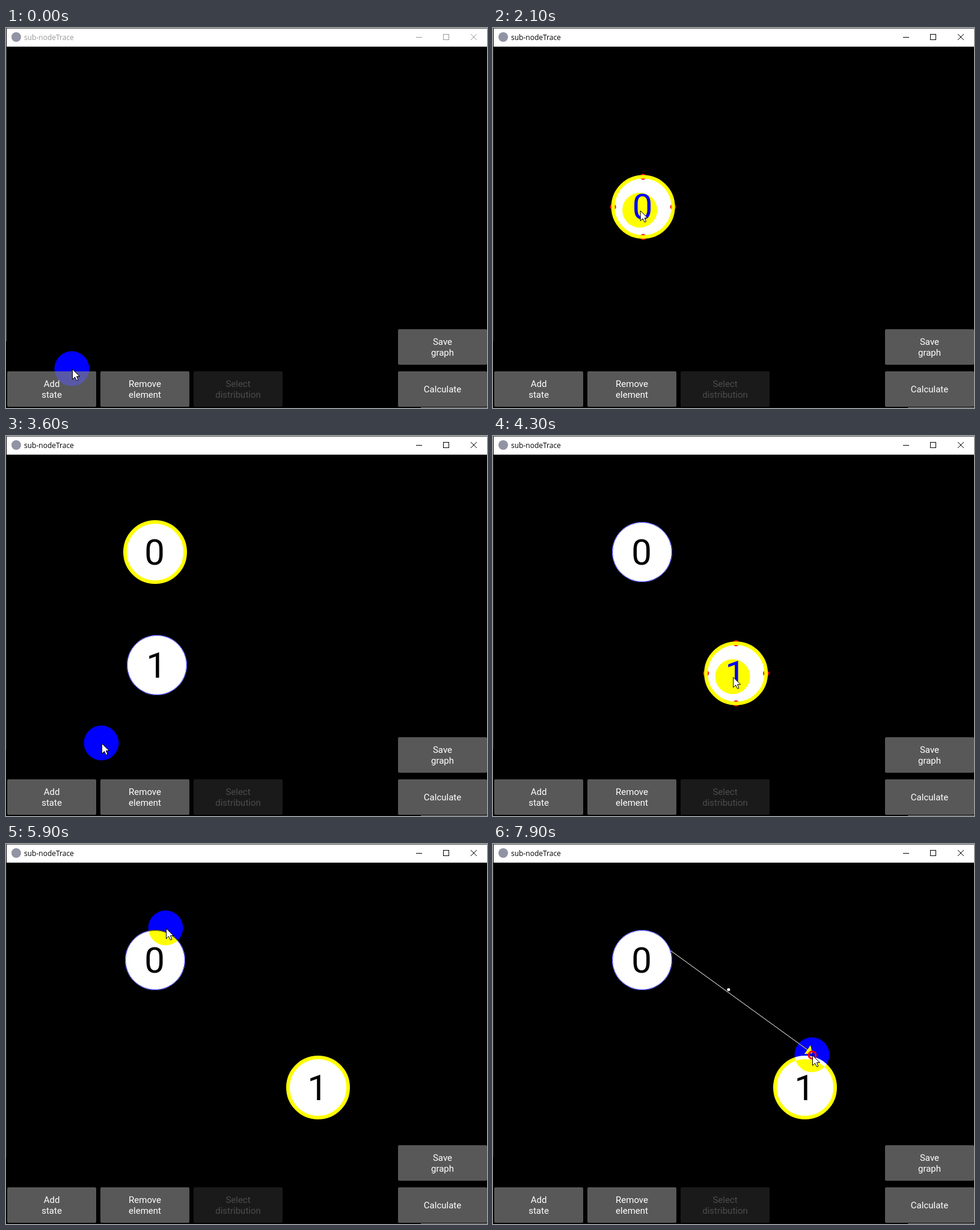
An HTML page with a canvas that plays this animation: 800x632 px, repeating every 8 s.

```html
<!DOCTYPE html>
<html lang="en">
<head>
<meta charset="utf-8">
<style>
  html, body { margin: 0; height: 100%; overflow: hidden; background: #000; }
  canvas { display: block; }
</style>
</head>
<body>
<canvas width="800" height="632"></canvas>
<script>
const ctx = document.querySelector('canvas').getContext('2d');
const LOOP = 8000, TICK = 100;
const WHITE = '#fff', YELLOW = '#ff0', RED = '#f00';
const RADIUS = 50;
const SPAWN = [251, 381], ADD_BUTTON = [97, 590], GRAB = [246, 387], ANCHOR = [248, 146];

// Pointer stops, joined by straight moves
const stops = [
  { t: 100, at: [110, 567] },
  { t: 500, at: ADD_BUTTON },
  { t: 900, at: ADD_BUTTON },
  { t: 1400, at: [179, 424] },
  { t: 1700, at: GRAB },
  { t: 2600, at: [243, 199] },
  { t: 3300, at: ADD_BUTTON },
  { t: 3500, at: ADD_BUTTON },
  { t: 3600, at: [159, 511] },
  { t: 3900, at: GRAB },
  { t: 4600, at: [514, 411] },
  { t: 5100, at: [381, 259] },
  { t: 5900, at: [266, 140] },
  { t: 6300, at: ANCHOR },
  { t: 7000, at: ANCHOR },
  { t: 7900, at: [531, 351] }
];

const nodes = [
  { label: '0', press: 700, born: 800, grab: 1700, drop: 2600, deselect: 3900 },
  { label: '1', press: 3400, born: 3500, grab: 3900, drop: 4600, deselect: LOOP }
];
const EDGE_START = 7000, EDGE_CLICK = 7900;

const clamp = (v, lo, hi) => Math.min(Math.max(v, lo), hi);

function pointerAt(t) {
  t = clamp(t, stops[0].t, stops[stops.length - 1].t);
  const i = Math.max(1, stops.findIndex(s => s.t >= t));
  const a = stops[i - 1], b = stops[i];
  const k = (t - a.t) / (b.t - a.t);
  return a.at.map((v, axis) => v + (b.at[axis] - v) * k);
}

function nodeCenter({ grab, drop }, t) {
  const p = pointerAt(clamp(t, grab, drop));
  return SPAWN.map((v, axis) => v + p[axis] - GRAB[axis]);
}

function disc(x, y, r, color) {
  ctx.fillStyle = color;
  ctx.beginPath();
  ctx.arc(x, y, r, 0, Math.PI * 2);
  ctx.fill();
}

function ring(x, y, r, width, color) {
  ctx.strokeStyle = color;
  ctx.lineWidth = width;
  ctx.beginPath();
  ctx.arc(x, y, r, 0, Math.PI * 2);
  ctx.stroke();
}

function lines(color, ...segments) {
  ctx.strokeStyle = color;
  ctx.lineWidth = 1;
  ctx.beginPath();
  for (const [x1, y1, x2, y2] of segments) {
    ctx.moveTo(x1, y1);
    ctx.lineTo(x2, y2);
  }
  ctx.stroke();
}

function polygon(points, color) {
  ctx.fillStyle = color;
  ctx.beginPath();
  points.forEach(p => ctx.lineTo(...p));
  ctx.closePath();
  ctx.fill();
}

function rect(x, y, w, h, color) {
  ctx.fillStyle = color;
  ctx.fillRect(x, y, w, h);
}

function text(str, x, y, font, color, align = 'center') {
  ctx.font = font;
  ctx.fillStyle = color;
  ctx.textAlign = align;
  ctx.fillText(str, x, y);
}

function drawWindow(active) {
  const ink = active ? '#000' : '#999';
  rect(0, 0, 800, 632, '#000');
  rect(0, 31, 1, 490, active ? '#222' : '#555');
  rect(0, 0, 800, 1, '#444');
  rect(690, 631, 110, 1, '#888');
  rect(1, 1, 799, 30, WHITE);
  disc(17, 15, 8, '#9094a4');
  text('sub-nodeTrace', 30, 20, '12px "Open Sans", sans-serif', ink, 'left');
  lines(ink, [682, 15.5, 692, 15.5], [773, 10, 783, 20], [783, 10, 773, 20]);
  ctx.strokeRect(727.5, 10.5, 9, 9);
}

function drawButton(x, y, label, fill = '#585858', color = WHITE) {
  ctx.fillStyle = fill;
  ctx.beginPath();
  ctx.roundRect(x, y, 148, 59, 2);
  ctx.fill();
  const rows = label.split(' ');
  rows.forEach((row, i) =>
    text(row, x + 74, y + 35 + (i - (rows.length - 1) / 2) * 18, '15px Roboto, sans-serif', color));
}

function drawEdge(px, py) {
  const [cx, cy] = nodeCenter(nodes[0], LOOP);
  const sx = cx, sy = cy - RADIUS;
  // The tip keeps the offset with which the anchor was grabbed
  const x = px + sx - ANCHOR[0], y = py + sy - ANCHOR[1];
  const length = Math.hypot(x - sx, y - sy) || 1;
  const ux = (x - sx) / length, uy = (y - sy) / length;
  const bx = x - ux * 10, by = y - uy * 10;
  lines(WHITE, [sx, sy, x, y]);
  disc((sx + x) / 2 + uy * 4, (sy + y) / 2 - ux * 4, 2.5, WHITE);
  polygon([[x, y], [bx + uy * 9, by - ux * 9], [bx - uy * 9, by + ux * 9]], WHITE);
}

function drawNode(node, t, px, py) {
  const [x, y] = nodeCenter(node, t);
  disc(x, y, RADIUS, WHITE);
  if (Math.hypot(px - x, py - y) < RADIUS + 3)
    for (let a = 0; a < 4; a++)
      disc(x + RADIUS * Math.cos(a * Math.PI / 2), y + RADIUS * Math.sin(a * Math.PI / 2), 5, RED);
  if (t >= node.grab && t < node.deselect) ring(x, y, RADIUS, 6, YELLOW);
  else ring(x, y, RADIUS - 0.5, 1, '#22f');
  text(node.label, x - 1, y + 21, '60px Roboto, sans-serif', '#000');
}

function drawPointer(x, y, clicked) {
  ctx.globalCompositeOperation = 'difference';
  disc(x - 0.5, y - 0.5, 29, '#00f');
  ctx.globalCompositeOperation = 'source-over';
  if (clicked) ring(x, y, 6, 3, RED);
  ctx.save();
  ctx.translate(x + 0.5, y + 0.5);
  polygon([[0, 0], [0, 17], [4, 13], [7, 19], [9.5, 18], [7, 12], [12, 12]], WHITE);
  ctx.strokeStyle = '#000';
  ctx.lineWidth = 1;
  ctx.stroke();
  ctx.restore();
}

function draw(t) {
  const [x, y] = pointerAt(t);
  const pressed = nodes.some(n => t >= n.press && t < n.born);
  drawWindow(t >= 300);
  drawButton(2, 571, 'Add state', pressed ? '#32a4ce' : undefined);
  drawButton(157, 571, 'Remove element');
  drawButton(312, 571, 'Select distribution', '#1a1a1a', '#4c4c4c');
  drawButton(652, 501, 'Save graph');
  drawButton(652, 571, 'Calculate');
  if (t >= EDGE_START) drawEdge(x, y);
  for (const node of nodes) if (t >= node.born) drawNode(node, t, x, y);
  drawPointer(x, y, t >= EDGE_CLICK);
}

function tick(now) {
  draw(Math.floor(now % LOOP / TICK) * TICK);
  requestAnimationFrame(tick);
}
requestAnimationFrame(tick);
</script>
</body>
</html>
```
